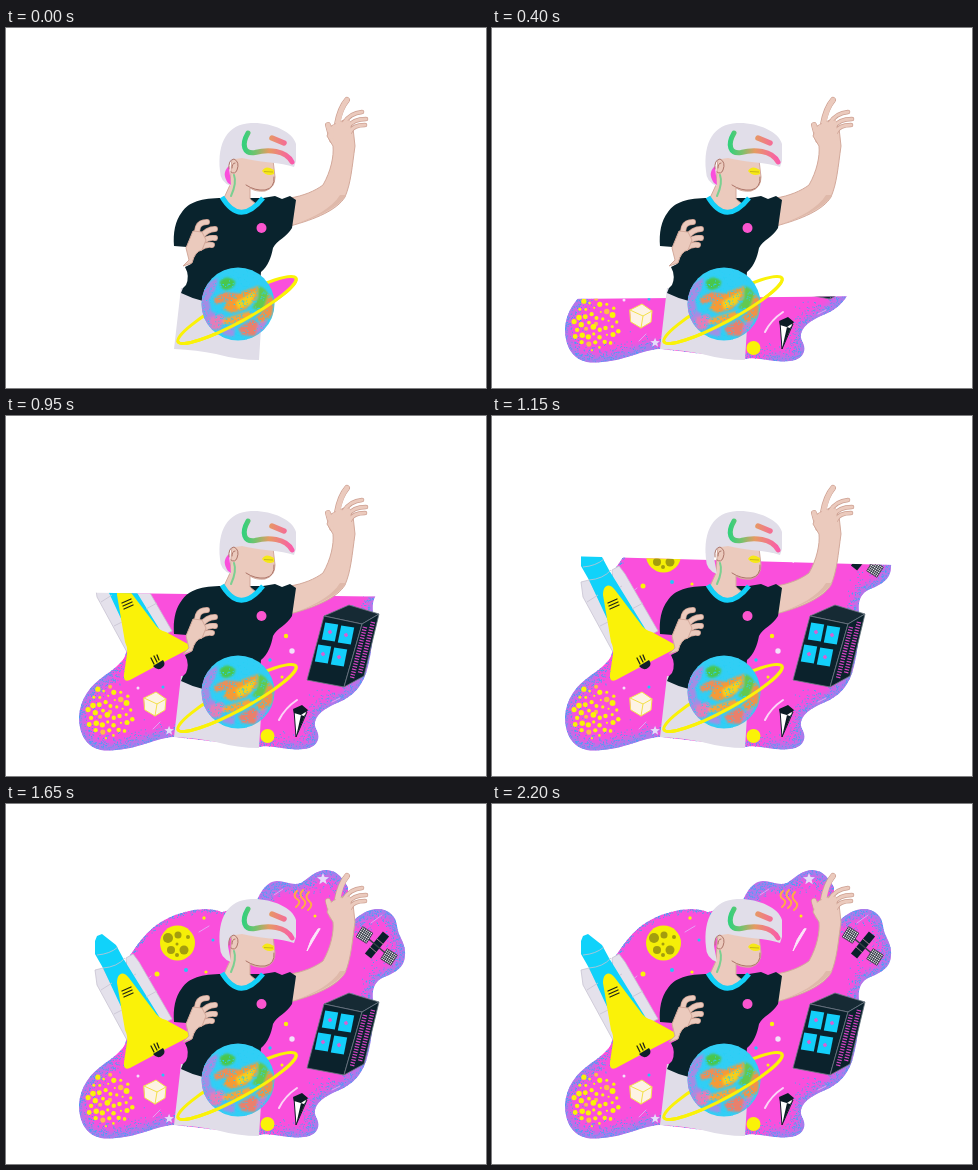
An HTML page that plays this animation: 480x360 px, repeating every 2.25 s.

```html
<!DOCTYPE html>
<html lang="en">
<head>
<meta charset="utf-8">
<title>Virtual space</title>
<style>
html, body { margin: 0; width: 100%; height: 100%; overflow: hidden; background: #fff; }
svg { display: block; width: 100vw; height: 100vh; }
.line { fill: none; stroke-linecap: round; stroke-linejoin: round; }
.skin { fill: #ebcabd; stroke: #d3a99b; stroke-width: 1; }
</style>
</head>
<body>
<svg viewBox="0 0 480 360">
  <defs>
    <linearGradient id="stripe" gradientUnits="userSpaceOnUse" x1="238" x2="288" y1="0" y2="0">
      <stop offset="0" stop-color="#35d07c"/><stop offset=".25" stop-color="#7cc06c"/>
      <stop offset=".5" stop-color="#e69a62"/><stop offset="1" stop-color="#fb58ae"/>
    </linearGradient>
    <filter id="soft"><feGaussianBlur stdDeviation="3.5"/></filter>
    <filter id="blend"><feGaussianBlur stdDeviation=".8"/></filter>
    <clipPath id="reveal"><polygon id="curtain"/></clipPath>
    <clipPath id="inBlob"><use href="#blob"/></clipPath>
    <clipPath id="inGlobe"><circle cx="232" cy="276" r="36.500"/></clipPath>
    <path id="blob" d="M73 301C74 283 84 270 98 260C111 251 122 242 120 232L110 190L121 156C133 137 144 122 164 113C181 106 201 102 216 108L250 98C255 86 262 77 271 77C280 77 286 82 295 79C304 73 310 66 321 66C332 67 336 74 342 83L342 122C350 114 358 106 370 105C381 104 390 111 391 122C392 133 400 138 399 151C399 163 389 169 378 173C367 178 366 187 367 198C368 215 366 234 362 250C358 269 347 281 331 287C317 293 305 302 310 313C316 323 310 332 298 333C282 335 268 329 254 331L168 321C149 322 134 333 105 334.500C82 336 73 320 73 301Z"/>
  </defs>

  <g clip-path="url(#reveal)">
    <g clip-path="url(#inBlob)">
      <use href="#blob" fill="#fa4fdc"/>
      <g class="line" stroke="#a27fee" stroke-width="12" filter="url(#soft)">
        <path d="M98 260C65 280 65 312 82 328C95 341 125 333 160 320M258 98C264 73 280 80 294 79C307 66 325 59 340 78"/>
        <path d="M348 115C385 94 390 112 393 126C406 145 398 168 378 174C365 180 369 200 366 235C360 275 340 282 318 296C300 306 326 327 301 334L280 333"/>
      </g>
      <path id="specks" fill="#43a4f5"/>
    </g>

    <g id="dots"></g>
    <path d="M314 125L301 147Q304 135 312 125Z" class="line" style="fill:#fbe6fa" stroke="#fbe6fa"/>
    <path d="M273 304Q279 292 291 284" class="line" stroke="#fbd5f7" stroke-width="2"/>
    <path d="M365 119L376 111M137 179L145 172M290 176L300 169M326 286L334 282M147 313L154 306M193 128L203 122M268 91L277 85" class="line" stroke="#e5a0f5"/>
    <path d="M291 87q-5 5 0 8t-1 8M297 86q-5 5 0 9t-1 9M303 88q-5 5 0 9t-1 9" class="line" stroke="#ffad43" stroke-width="2"/>
    <path id="star" d="M317 69l1.600 4 4.400.3-3.400 2.700 1.200 4.200-3.800-2.400-3.700 2.400 1.200-4.200-3.500-2.700 4.300-.3z" fill="#e6dcfa"/>
    <use href="#star" transform="translate(-90.500 254.500) scale(.8)"/>

    <circle cx="171.500" cy="139" r="17.500" fill="#f5ef08"/>
    <g fill="#a39d0e">
      <circle cx="162" cy="134" r="5"/><circle cx="172" cy="131" r="3.500"/>
      <circle cx="165" cy="146" r="4"/><circle cx="178" cy="146" r="4.500"/>
      <circle cx="171" cy="140" r="1.500"/><circle cx="182" cy="133" r="2"/><circle cx="171" cy="151" r="2"/>
    </g>

    <g stroke="#c8c3d2" stroke-width=".8" stroke-linejoin="round">
      <path d="M89 166L97 164L123 212L122 238L91 181Z" fill="#e4e1eb"/>
      <path d="M120 154L127 150L133 158L166 215L151 222L121 167Z" fill="#e4e1eb"/>
      <path d="M89 137L91 132L96 130L110 141L117 154L154 214L124 222L97 164L89 150Z" fill="#10d2fa" stroke="none"/>
      <path d="M91 151Q104 150 112 143M97 164Q111 163 119 154M95 186L106 179M128 171L130 170M108 210L116 206M140 193L151 187" fill="none"/>
    </g>
    <path d="M111 179C111 169 117 166 123 174L148 207Q152 214 160 216L180 227Q187 230 181 234L152 249L124 264Q117 267 118 258L121 238Q122 232 119 226Z" fill="#faf208"/>
    <path d="M116 187l9-4M117 190l9-4M118 193l9-4M145 242l3 6M148 240l3 6M151 239l2 5" class="line" stroke="#222615" stroke-width="1.300"/>
    <path d="M147 250L157 244Q160 248 157 251Q152 256 147 250Z" fill="#10202a"/>

    <g stroke="#6b7983" stroke-width=".8" stroke-linejoin="round">
      <path d="M318 200L343 189L373 198L356 208Z" fill="#162a34"/>
      <path d="M318 200L356 208L338 271L301 264Z" fill="#0b222c"/>
      <path d="M356 208L373 198L358 260L338 271Z" fill="#0b222c"/>
    </g>
    <path d="M359 211L346 262M367 206L354 257" stroke="#d744c6" stroke-width="4.500" stroke-dasharray="1.200 1.500"/>
    <g id="windows"></g>

    <path d="M362 152L380 130" stroke="#0a202a" stroke-width="8"/>
    <path d="M364 143l7 6M371 135l7 6" stroke="#c9a" stroke-width=".8"/>
    <path d="M358 131L384 153" stroke="#344" stroke-width="1.500"/>
    <g id="panels"></g>

    <path d="M138 282L150 276L160 283L159 294L149 300L139 294Z" fill="#fdf3e4"/>
    <path d="M138 282L150 276L160 283L159 294L149 300L139 294ZM138 282L151 288L160 283M151 288L149 300" class="line" stroke="#f3e04a"/>
    <path d="M288 294L301 296L290 321Z" fill="#fff" stroke="#0b1c25" stroke-linejoin="round"/>
    <path d="M287 293L296 289L302 294L298 300L288 297ZM301 295L295 299L290 321Z" fill="#0b1c25"/>
    <circle cx="261.500" cy="320" r="7" fill="#faf208"/>
  </g>

  <path d="M175 260L168 321Q191 322 210 326Q232 332 253 332L255 300L252 262Z" fill="#e0dde8"/>

  <g id="rightHand"></g>
  <path class="skin" d="M284 170C297 168 309 163 317 157C325 143 328 128 327 118L321 108L325 98L342 90L347 100L349 118C346 139 345 155 339 169C331 182 310 191 284 198Z"/>
  <path d="M340 167C332 180 310 190 287 197C309 189 326 180 334 167Z" fill="#dfb9aa"/>
  <g id="rightFingers"></g>

  <path d="M217 170C195 170 183 174 176 184C169 193 167 205 168 218L181 219L185 236L179 239Q184 248 180 257L177 260L175 265Q185 270 197 273L252 275L255 244C262 238 265 230 267 220C271 212 281 209 286 200L290 172L284 168L276 171L269 168L257 170Z" fill="#09232d"/>
  <circle cx="255.500" cy="200" r="5" fill="#fb55cf"/>
  <path class="skin" stroke="none" d="M226 128L267 132L269 149Q269 160 259 163Q250 164 244 160L244 171L250 176Q233 192 218 170L224 157Z"/>
  <path d="M216 169Q234 199 257 170" class="line" stroke="#12cff8" stroke-width="5" style="stroke-linecap:butt"/>
  <path d="M214 143C211 114 222 96 245 95C264 94 287 103 290 116L290 133L288 139C275 134 255 135 236 130L229 131Q223 132 222 142L225 158Q214 154 214 143Z" fill="#e1dee9"/>
  <path id="hairGap" d="M223 138Q215 145 222 155L225 157Z" fill="#fa4fdc"/>
  <path d="M223 141Q222 132 228 131Q234 134 231 142Q229 147 225 144M226 140q0-5 3-5M268 149Q269 160 259 162Q249 163 240 157" class="line" stroke="#ad7569" stroke-width="1"/>
  <path d="M228 147Q231 155 225 168" class="line" stroke="#7bcf91" stroke-width="2"/>
  <path d="M256 143Q259 138 264 140L268 142V146Q261 149 256 143Z" fill="#f6e817"/>
  <path d="M258 143.500L267 144" stroke="#bda91c" stroke-width=".8"/>
  <path d="M242 105C235 117 238 126 249 124.500C262 121 280 122 286 134" class="line" stroke="url(#stripe)" stroke-width="5"/>
  <path d="M266 110L278 115" class="line" stroke="url(#stripe)" stroke-width="5.500"/>

  <g id="leftHand"></g>

  <g transform="rotate(-28.400 231 282)">
    <ellipse id="ringFill" cx="231" cy="282" rx="67" ry="12" fill="#fa4fdc" style="clip-path:inset(0 0 0 50%)"/>
    <ellipse cx="231" cy="282" rx="67" ry="12" fill="none" stroke="#faf208" stroke-width="3"/>
  </g>
  <circle cx="232" cy="276" r="36.500" fill="#31cef5"/>
  <g clip-path="url(#inGlobe)">
    <g filter="url(#blend)">
      <path d="M195 264Q202 253 212 250L209 262L203 272L205 283L214 288L206 303L193 290Z" fill="#a58be4"/>
      <path d="M203 290L216 286L220 292L213 302L206 301Z" fill="#e57bb8"/>
      <path d="M214 253Q221 246 229 253Q230 260 220 262Q213 261 214 253Z" fill="#48c74b"/>
      <path d="M208 270L219 264L234 266L224 273L209 276Z" fill="#ef8d55"/>
      <path d="M220 275L236 264L252 258L251 270L240 281L226 285L217 281Z" fill="#f79a36"/>
      <path d="M230 274L250 263L245 276L232 281Z" fill="#f5d01d"/>
      <path d="M252 258Q262 260 263 270L256 283L246 280L252 270Z" fill="#62c94f"/>
      <path d="M263 266L268 272L266 288L256 295L249 290L257 283Z" fill="#f0924a"/>
      <path d="M217 291L244 283L248 288L232 296L217 296Z" fill="#f8a43a"/>
      <path d="M232 300L247 291L254 297L249 308L236 307Z" fill="#e9806c"/>
      <path d="M252 296L262 292L257 302L250 306Z" fill="#b884da"/>
      <path d="M218 300L229 298L228 309L216 306Z" fill="#9d91e6"/>
    </g>
    <path id="grain" fill="#29cff5"/>
  </g>
  <path d="M164 282A67 12 0 0 0 298 282" transform="rotate(-28.400 231 282)" class="line" stroke="#faf208" stroke-width="3"/>
</svg>

<script>
const $ = id => document.getElementById(id);
let seed = 7;
const rnd = () => (seed = seed * 16807 % 2147483647) / 2147483647;
const gauss = () => rnd() + rnd() + rnd() - 1.5;
const circle = (x, y, r, fill) => `<circle cx="${x}" cy="${y}" r="${r}" fill="${fill}"/>`;
const speck = (x, y) => `M${x.toFixed(1)} ${y.toFixed(1)}h1v1h-1z`;

// Outlined fingers: a dark wide stroke below a skin-coloured one.
const fingers = (d, w) => [['#cda092', w + 1.4], ['#ebcabd', w]].map(([c, s]) =>
  `<path d="${d}" class="line" stroke="${c}" stroke-width="${s}"/>`).join('');

$('rightHand').innerHTML = fingers('M331 96Q334 80 341 72M326 112L322 97', 4.5);
$('rightFingers').innerHTML = fingers('M338 95Q344 85 356 84M342 99Q347 91 360 91M344 104Q347 97 359 97', 3.2) +
  '<path d="M332 96Q335 79 341 72M326 109L322 97" class="line" stroke="#ebcabd" stroke-width="4.300"/>' +
  '<path d="M327 97L344 92L346 116L328 116Z" fill="#ebcabd"/>';
$('leftHand').innerHTML = fingers('M188 216L192 199Q194 194 201 194M195 209Q201 201 209 201M196 214Q202 209 209 210M194 220Q200 216 206 217', 4.5) +
  '<path class="skin" d="M177 238L183 232L180 220L187 203L196 204L200 212L196 222Q189 223 186 235Z"/>';

// Speckled blue rim, sparse along the upper left.
const edge = $('blob'), size = edge.getTotalLength();
let rim = '';
for (let i = 0; i < 5500; i++) {
  const p = edge.getPointAtLength(rnd() * size), spread = p.x < 252 && p.y < 240 ? 3 : 15;
  if (spread > 3 || rnd() < .3) rim += speck(p.x + gauss() * spread, p.y + gauss() * spread);
}
$('specks').setAttribute('d', rim);

let grain = '';
for (let i = 0; i < 500; i++) grain += speck(196 + rnd() * 72, 240 + rnd() * 72);
$('grain').setAttribute('d', grain);

// Evenly spread cluster on a sunflower spiral.
let dots = '';
for (let i = 0; i < 44; i++) {
  const a = i * 2.4, r = 4.2 * Math.sqrt(i);
  dots += circle(104 + r * Math.cos(a) * .85, 296 + r * Math.sin(a), 1 + rnd() * 2, i % 9 ? '#faf208' : '#ffbd47');
}
const small = [[280, 220, 2.2, 0], [286, 235, 2.7, 1], [264, 244, 1.7, 2], [180, 166, 2, 2], [151, 170, 2.5, 0],
  [200, 168, 1.6, 0], [309, 112, 1.5, 0], [198, 114, 1.7, 0], [303, 187, 1.5, 2], [276, 261, 1.5, 0],
  [157, 271, 1.5, 2], [132, 272, 1.5, 1], [207, 136, 1.5, 2]];
for (const [x, y, r, c] of small) dots += circle(x, y, r, ['#faf208', '#f3e1fa', '#20c8f8'][c]);
$('dots').innerHTML = dots;

$('windows').innerHTML = [[324, 216], [340, 219], [317, 238], [333, 241]].map(([x, y]) =>
  `<g transform="matrix(1 .14 -.2 1 ${x} ${y})"><path d="M-6.500-8.500h13v17h-13z" fill="#13cffa"/>` +
  '<path d="M-2 0h4M0-2v4" stroke="#d85fd4" stroke-width="1.800"/></g>').join('');

$('panels').innerHTML = [[358.5, 131], [383, 153]].map(([x, y]) => {
  let grid = '';
  for (let i = -6; i <= 6; i += 2) grid += `M${i}-6V6M-6 ${i}H6`;
  return `<g transform="translate(${x} ${y}) rotate(32)"><path d="M-6-6H6V6H-6Z" fill="#eeeaf0"/>` +
    `<path d="${grid}" stroke="#18242d" stroke-width=".7"/></g>`;
}).join('');

// Time, left and right height of the rising curtain.
const rise = [[0, 336, 336], [400, 271, 268], [750, 213, 213], [1150, 140, 149], [1450, 98, 101], [1650, 65, 65], [2250, 65, 65]];
const show = (id, on) => $(id).style.display = on ? '' : 'none';
function draw(now) {
  const t = Math.floor(now % 2250 / 50) * 50;
  const i = rise.findIndex(k => k[0] > t), a = rise[i - 1], b = rise[i];
  const k = (t - a[0]) / (b[0] - a[0]);
  const left = a[1] + (b[1] - a[1]) * k, right = a[2] + (b[2] - a[2]) * k;
  $('curtain').setAttribute('points', `73,${left} 400,${right} 400,336 73,336`);
  show('ringFill', t < 50);
  show('hairGap', t < 1150);
}
const start = performance.now();
function tick() {
  draw(performance.now() - start);
  requestAnimationFrame(tick);
}
tick();
</script>
</body>
</html>
```
